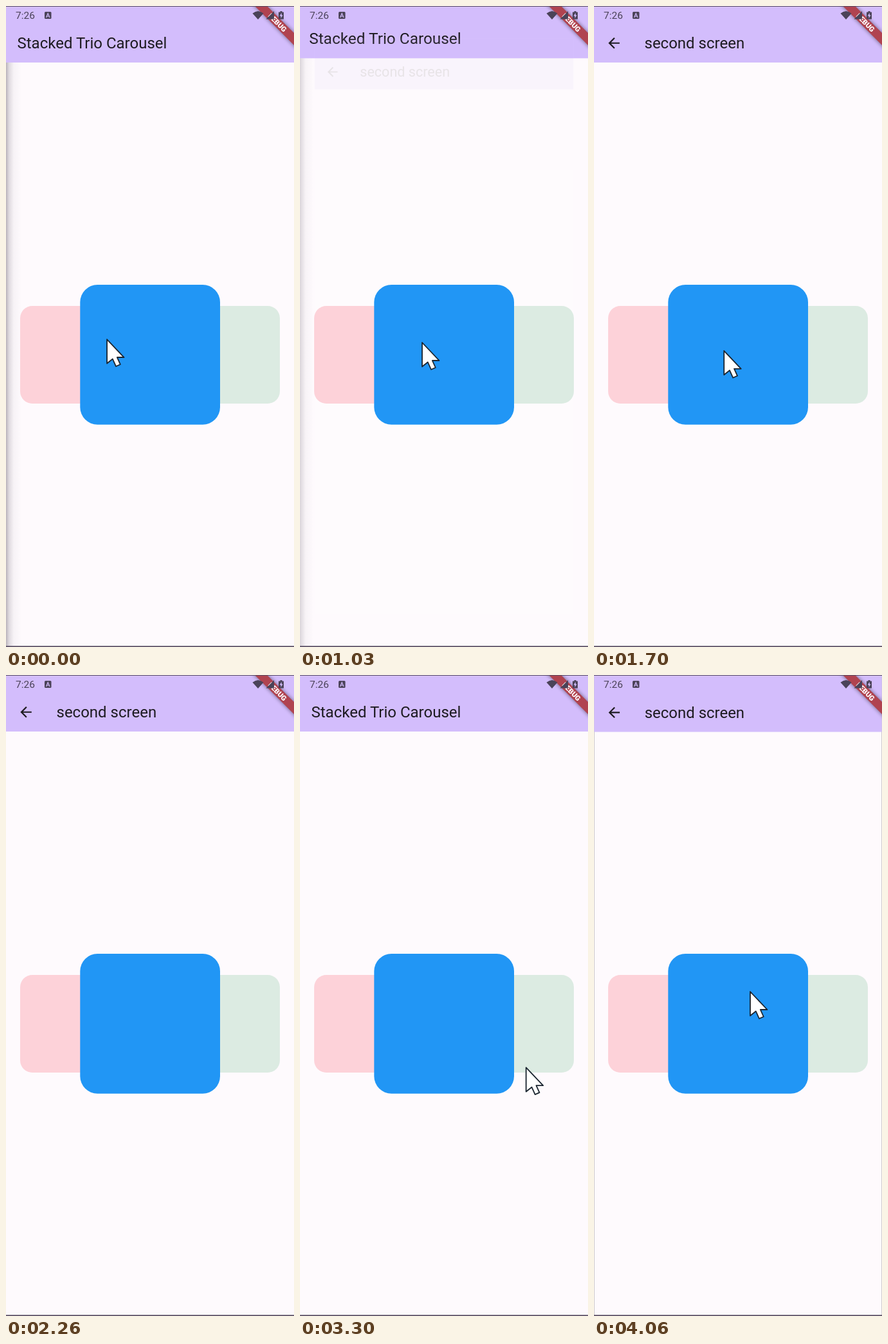
Animation of 448 by 998 pixels, one loop 4100 ms. Source, as an HTML page:

```html
<!DOCTYPE html>
<html lang="en">
<head>
<meta charset="utf-8">
<title>Stacked Trio Carousel</title>
<style>
  html, body { margin: 0; width: 100%; height: 100%; overflow: hidden; background: #fefafd; }
  svg { display: block; width: 100%; height: 100%; }
  text { font-family: Roboto, "Open Sans", sans-serif; }
  .page, #scrim { transform-box: view-box; transform-origin: 224px 499px; }
  .paper { fill: #fefafd; }
  .bar { fill: #d3bdfc; }
  .title { font-size: 24px; fill: #1d1b20; }
  .status { fill: #4b4359; }
  .frame { fill: #594e63; }
</style>
</head>
<body>
<svg viewBox="0 0 448 998">
  <defs>
    <linearGradient id="edge">
      <stop offset="0" stop-color="#4a4050" stop-opacity=".38"/>
      <stop offset=".2" stop-color="#4a4050" stop-opacity=".17"/>
      <stop offset=".5" stop-color="#4a4050" stop-opacity=".04"/>
      <stop offset="1" stop-color="#4a4050" stop-opacity="0"/>
    </linearGradient>
    <filter id="blur" x="-20%" y="-150%" width="140%" height="400%">
      <feGaussianBlur stdDeviation="3"/>
    </filter>
  </defs>

  <g id="home" class="page">
    <rect class="paper" width="448" height="998"/>
    <rect class="bar" width="448" height="88"/>
    <text class="title" x="17.5" y="66">Stacked Trio Carousel</text>
    <rect id="shade" y="88" width="24" height="910" fill="url(#edge)"/>
  </g>

  <rect id="scrim" width="448" height="998"/>

  <g id="second" class="page">
    <rect class="paper" width="448" height="998"/>
    <rect class="bar" width="448" height="88"/>
    <path transform="translate(18 44.7) scale(1.09)" fill="#1d1b20"
      d="M20 11H7.83l5.59-5.59L12 4l-8 8 8 8 1.41-1.41L7.83 13H20z"/>
    <text class="title" x="78.5" y="66">second screen</text>
  </g>

  <g id="cards">
    <rect x="22" y="467" width="152" height="152" rx="19" fill="#fdd2d9"/>
    <rect x="274" y="467" width="152" height="152" rx="19" fill="#dcebe2"/>
    <rect x="115.3" y="434" width="217.7" height="217.7" rx="27" fill="#2196f5"/>
  </g>

  <g id="banner" transform="translate(422.25 25.75) rotate(45)">
    <rect x="-60" y="-6.7" width="120" height="13.4" opacity=".5" filter="url(#blur)"/>
    <rect x="-60" y="-6.7" width="120" height="13.4" fill="#b04350"/>
    <text y="4" text-anchor="middle" font-size="11.1" font-weight="900" fill="#fff">DEBUG</text>
  </g>

  <g class="status">
    <text x="15" y="20" font-size="15.5">7:26</text>
    <rect x="60" y="9" width="10.5" height="11" rx="1.5"/>
    <path d="M62.5 18 65.2 11.5 68 18M63.6 16H66.9" fill="none" stroke="#d3bdfc" stroke-width="1.2"/>
    <path d="M383.5 11.5Q392 4.500 400.500 11.500L392 21Z"/>
    <path d="M417 8V20.500H404.500Z"/>
    <path d="M426.500 8H429.500V9.500H432V20.500H424V9.500H426.500Z"/>
    <path d="M428.700 10.800 425.600 15.500H427.600V19L430.600 14.200H428.700Z" fill="#d3bdfc"/>
  </g>

  <rect class="frame" width="448" height="1"/>
  <rect class="frame" y="996.3" width="448" height="1.7"/>

  <path id="cursor" d="M0 0V37.500L8.800 30.500 14 42 20.800 39 15.800 28H26.500Z"
    fill="#fff" stroke="#1b2530" stroke-width="1.8" stroke-linejoin="round"/>
</svg>

<script>
const LOOP = 4100, SLIDE = 300;
const PUSHES = [990, 3838], POP = 2768;

// Pointer waypoints: ms, x, y
const TRAIL = [
  [0, 157, 519], [420, 190, 524], [1680, 190, 524], [1920, 330, 670], [2090, 452, 824],
  [3090, 452, 830], [3200, 396, 660], [3560, 238, 486], [3780, 238, 486], [3920, 243, 493], [LOOP, 243, 493]
];

const el = id => document.getElementById(id);
const [home, second, scrim, shade, cursor] = ["home", "second", "scrim", "shade", "cursor"].map(el);
const clamp = v => Math.min(1, Math.max(0, v));
const mix = (a, b, k) => a + (b - a) * k;
const span = (t, from, to) => clamp((t - from) / (to - from));

function bezier(x1, y1, x2, y2) {
  const at = (a, b, u) => 3 * (1 - u) * (1 - u) * u * a + 3 * (1 - u) * u * u * b + u ** 3;
  return x => {
    let lo = 0, hi = 1;
    for (let i = 0; i < 24; i++) {
      const mid = (lo + hi) / 2;
      if (at(x1, x2, mid) < x) lo = mid; else hi = mid;
    }
    return at(y1, y2, (lo + hi) / 2);
  };
}

const KNEE = 1 / 6;
const rise = bezier(0.05, 0, 0.1333, 0.06);
const settle = bezier(0.2083, 0.82, 0.25, 1);
const zoom = t => t < KNEE ? 0.4 * rise(t / KNEE) : 0.4 + 0.6 * settle(span(t, KNEE, 1));

function pose(node, scale, opacity) {
  node.style.transform = scale === 1 ? "none" : `scale(${scale})`;
  node.style.opacity = opacity;
}

function drawPush(t) {
  const k = t < 1 ? zoom(t) : 1;
  pose(home, mix(1, 1.05, k), 1);
  pose(second, mix(0.85, 1, k), span(t, 0.125, 0.25));
  scrim.style.opacity = t < 1 ? 0.6 * span(t, 0.2075, 0.4175) : 0;
}

function drawPop(t) {
  const k = t < 1 ? zoom(t) : 1;
  pose(home, mix(1.1, 1, k), 1);
  pose(second, mix(1, 0.9, k), 1 - span(t, 0.0825, 0.2075));
  scrim.style.opacity = 0;
}

function drawPages(ms) {
  const start = ms < POP ? PUSHES[0] : PUSHES[1];
  if (ms >= POP && ms < start) drawPop(span(ms, POP, POP + SLIDE));
  else drawPush(span(ms, start, start + SLIDE));
  shade.style.opacity = ms < PUSHES[0] + SLIDE ? 1 : 0;
}

function drawCursor(ms) {
  const i = TRAIL.findIndex(p => p[0] > ms);
  const [t0, x0, y0] = TRAIL[i - 1], [t1, x1, y1] = TRAIL[i];
  const k = span(ms, t0, t1);
  cursor.setAttribute("transform", `translate(${mix(x0, x1, k)} ${mix(y0, y1, k)})`);
}

const begin = performance.now();
function tick() {
  const ms = (performance.now() - begin) % LOOP;
  drawPages(ms);
  drawCursor(ms);
  requestAnimationFrame(tick);
}
tick();
</script>
</body>
</html>
```
